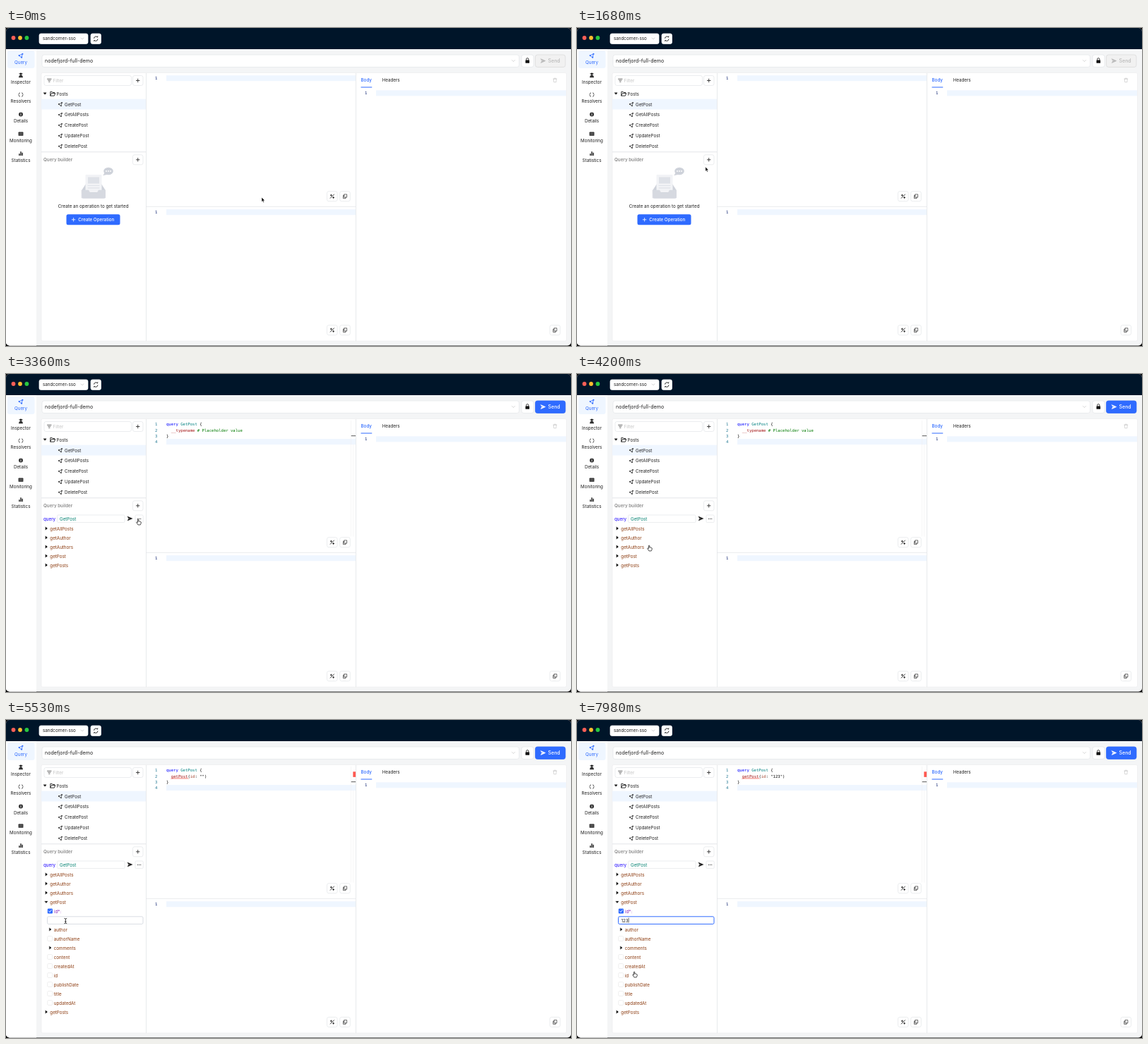
Animation, 800 px wide and 451 px high, one loop 8000 ms. Source, as an HTML page:

```html
<!DOCTYPE html>
<html lang="en">
<head>
<meta charset="utf-8">
<title>Query builder</title>
<style>
html, body { margin: 0; width: 100%; height: 100%; overflow: hidden; background: #000; }
svg { display: block; width: 100vw; height: 100vh; }
text { font-family: Inter, sans-serif; font-size: 6.25px; white-space: pre; }
.code { font-family: "DejaVu Sans Mono", monospace; font-size: 5.6px; }
</style>
</head>
<body>
<svg id="stage" viewBox="0 0 800 451"></svg>
<script>
const LOOP = 8000;
const BLUE = '#2f6bff', PALE = '#eff6ff', LINE = '#e3e5e8', INK = '#1f1f1f', BROWN = '#8b3a0e';

const rect = (x, y, w, h, fill, more = '') =>
  `<rect x="${x}" y="${y}" width="${w}" height="${h}" fill="${fill}" ${more}/>`;
const box = (x, y, w, h, fill = '#fff', stroke = LINE, r = 2.5) =>
  rect(x, y, w, h, fill, `stroke="${stroke}" stroke-width=".7" rx="${r}"`);
const path = (d, stroke = INK, fill = 'none', w = .8) =>
  `<path d="${d}" stroke="${stroke}" fill="${fill}" stroke-width="${w}" stroke-linejoin="round" stroke-linecap="round"/>`;
const dot = (x, y, r, fill) => `<circle cx="${x}" cy="${y}" r="${r}" fill="${fill}"/>`;
// y is the middle of the line
const text = (x, y, s, fill = INK, more = '') =>
  `<text x="${x}" y="${y + 2.3}" fill="${fill}" ${more}>${s}</text>`;
const code = (x, y, s, fill = '#000', more = '') =>
  `<text class="code" x="${x}" y="${y + 2}" fill="${fill}" ${more}>${s}</text>`;
const at = (x, y, s, k = 1) => `<g transform="translate(${x} ${y}) scale(${k})">${s}</g>`;
const group = (id, s) => `<g id="${id}">${s}</g>`;
const span = (s, fill) => `<tspan fill="${fill}">${s}</tspan>`;

const plus = (x, y, c = INK) => path(`M${x - 2.3} ${y}h4.6M${x} ${y - 2.3}v4.6`, c, 'none', .8);
const chevron = (x, y, c = '#bbb') => path(`M${x - 2} ${y - 1}l2 2 2-2`, c, 'none', .6);
const plane = (x, y, c) => at(x, y, path('M-3.4-3.1L3.6 0-3.4 3.1-2.2.5 1 0-2.2-.5Z', c, c, .3));
const nodes = (x, y, c, k = 1) => at(x, y,
  path('M-2 0L2-2L1 2.2Z', c, 'none', .7) + dot(-2.1, 0, .9, c) + dot(2.1, -2, .9, c) + dot(1, 2.3, .9, c), k);
const copyIcon = (x, y) => box(x - 7.3, y - 7, 14.6, 14) +
  path(`M${x - 1} ${y - 2.8}h3.6v4.2h-3.6zM${x - 1} ${y - 1.2}h-1.6v4.2h3.6v-1.6`, '#333', 'none', .7);
const wandIcon = (x, y) => box(x - 7.3, y - 7, 14.6, 14) +
  path(`M${x - 2.6} ${y + 2.6}l5.3-5.3M${x - 2.4} ${y - 1.5}h2M${x - 1.4} ${y - 2.5}v2M${x + .8} ${y + 1.8}h2M${x + 1.8} ${y + .8}v2`, '#222', 'none', .9);
const arrowRight = (x, y) => path(`M${x} ${y - 2}l2.6 2-2.6 2z`, '#000', '#000', .3);
const arrowDown = (x, y) => path(`M${x - 2} ${y - 1}h4l-2 2.5z`, '#000', '#000', .3);
const squiggle = (x, y, w) => {
  let d = `M${x} ${y}`;
  for (let i = 0; i < w; i += 2) d += 'l1-1 1 1';
  return path(d, '#e51400', 'none', .6);
};

function topBar() {
  return rect(0, 0, 800, 30, '#001529') +
    dot(10.5, 14, 2.9, '#ff5f57') + dot(20, 14, 2.9, '#febc2e') + dot(29.4, 14, 2.9, '#28c840') +
    box(47, 8, 69, 14.5, '#fff', '#fff') + text(52, 15, 'sandcorner-sso') + chevron(108, 15) +
    box(120, 8, 14.5, 14.5, '#fff', '#fff') +
    path('M124.6 14.4a2.7 2.7 0 0 1 4.9-1.2l.3-1.4M129.9 16a2.7 2.7 0 0 1-4.9 1.2l-.3 1.4', '#111', 'none', .9);
}

function sideBar() {
  const icons = [
    nodes(0, 0, BLUE, 1.15),
    dot(0, -1.7, 1.7, INK) + path('M-2.6-2h5.2M-2.6 3q0-2.8 2.6-2.8t2.6 2.8z', INK, INK, .5),
    path('M-1.5-2.7q-1 0-1 1.2t-.8 1.5q.8.3.8 1.5t1 1.2M1.5-2.7q1 0 1 1.2t.8 1.5q-.8.3-.8 1.5t-1 1.2', INK, 'none', .7),
    dot(0, 0, 3, '#333') + path('M0-.2v1.7M0-1.6v.1', '#fff', 'none', .8),
    rect(-3.4, -2.6, 6.8, 5.2, '#222', 'rx=".6"') + path('M-2.2-1h4.4M-2.2.8h4.4', '#ccc', 'none', .5),
    rect(-2.8, .2, 1.4, 2.8, INK) + rect(-.7, -2.8, 1.4, 5.8, INK) + rect(1.4, -1.2, 1.4, 4.2, INK)
  ];
  const labels = ['Query', 'Inspector', 'Resolvers', 'Details', 'Monitoring', 'Statistics'];
  return rect(0, 30, 43, 421, '#fff') + rect(2, 32, 38.5, 25, PALE, 'rx="3"') +
    labels.map((s, i) => at(21, 39 + 27.8 * i, icons[i]) +
      text(21, 48.5 + 27.8 * i, s, i ? INK : BLUE, 'text-anchor="middle"')).join('');
}

function sendButton(on) {
  const c = on ? '#fff' : '#b8b8b8';
  return box(749.5, 38, 42.5, 17.5, on ? BLUE : '#f1f1f1', on ? BLUE : '#d9d9d9', 3) + plane(760.5, 46.6, c) +
    text(767.5, 46.7, 'Send', c, 'style="font-size:7px" font-weight="500"');
}

function header() {
  return box(51, 38, 675.5, 17.5, '#fff', LINE, 3) +
    text(55, 46.8, 'nodefjord-full-demo', INK, 'style="font-size:7.1px"') + chevron(718.5, 46.6) +
    box(730, 38, 17, 17.5, '#fff', LINE, 3) +
    rect(735.5, 45.4, 5.6, 4.4, '#111', 'rx=".6"') + path('M736.7 45.4v-1.2a1.6 1.6 0 0 1 3.2 0v1.2', '#111', 'none', .8) +
    sendButton(false) + group('send', sendButton(true));
}

function tree() {
  const names = ['GetPost', 'GetAllPosts', 'CreatePost', 'UpdatePost', 'DeletePost'];
  return box(54, 67.5, 123.5, 14) + path('M58.5 72.3h5.6M59.6 74.3h3.4M60.6 76.3h1.4', '#333', 'none', .7) +
    text(66.5, 74.5, 'Filter', '#c4c4c4') +
    box(179.5, 67.5, 14.5, 14) + plus(186.7, 74.5) +
    arrowDown(55.2, 92.8) + path('M62.8 95.8v-5.4h2.4l.8 1h2.8v1.3M62.8 95.8l1.3-3.1h5.7l-1.3 3.1z', INK, 'none', .9) +
    text(71.5, 93.3, 'Posts') + rect(50, 100.7, 148.3, 14.8, PALE) +
    names.map((s, i) => nodes(77, 108 + 14.9 * i, '#333') + text(83, 108.2 + 14.9 * i, s)).join('');
}

function emptyState() {
  return at(124, 222,
    path('M-16.5 8L-11-.5H11L16.5 8V19H-16.5Z', '#ced2da', '#ced2da', .5) +
    rect(-11.5, -14, 23, 25, '#f2f3f6', 'rx="1.2"') + rect(-8, -10.5, 16, 9, '#dfe2e8') +
    path('M-8 1.5H8M-8 4.8H8', '#dfe2e8', 'none', 1.2) +
    path('M-16.5 8H-7Q-6 12 -3 12H3Q6 12 7 8H16.5V17.5Q16.5 19.5 14.5 19.5H-14.5Q-16.5 19.5-16.5 17.5Z', '#d6d9e0', '#d6d9e0', .5) +
    `<ellipse cx="21" cy="-19" rx="6.8" ry="5.2" fill="#ced2da"/>` + path('M16-17l-2.4 4 5-1.2z', '#ced2da', '#ced2da', .4) +
    dot(18, -19, .9, '#fff') + dot(21, -19, .9, '#fff') + dot(24, -19, .9, '#fff')) +
    text(123.6, 253, 'Create an operation to get started', INK, 'text-anchor="middle"') +
    rect(85.5, 264.3, 76, 15, BLUE, 'rx="2.5"') + plus(95.6, 271.8, '#fff') +
    text(102.3, 271.8, 'Create Operation', '#fff', 'font-weight="500"');
}

function field(name, y, kind, dx = 0) {
  const mark = kind === 'box' ? box(58.8, y - 3.4, 6.8, 6.8, '#fff', '#e8e8e8', 1.2)
    : kind === 'open' ? arrowDown(57, y) : arrowRight(56 + dx, y);
  return mark + text(62.3 + dx, y + .2, name, BROWN);
}

function builder() {
  const sub = ['author', 'authorName', 'comments', 'content', 'createdAt', 'id', 'publishDate', 'title', 'updatedAt'];
  const nested = ['author', 'comments'];
  return text(53, 205.2, 'query', '#1a00ff') + box(72.5, 200, 95.5, 10.6, '#fff', LINE, 1.5) +
    text(76, 205.2, 'GetPost', '#008070') + plane(175.5, 205, '#111') +
    box(183, 200, 11.2, 10.6, '#fff', LINE, 1.5) + dot(186.5, 205.3, .6, INK) + dot(188.6, 205.3, .6, INK) + dot(190.7, 205.3, .6, INK) +
    ['getAllPosts', 'getAuthor', 'getAuthors'].map((s, i) => field(s, 219 + 13 * i)).join('') +
    group('closed', field('getPost', 258) + field('getPosts', 271)) +
    group('open', field('getPost', 258, 'open') +
      rect(58.8, 267.4, 7.2, 7.2, BLUE, 'rx="1.3"') + path('M60.6 271l1.3 1.5 2.5-3', '#fff', 'none', .9) +
      text(68, 271.2, 'id*:', '#8b2bb9') +
      `<rect id="idBox" x="58.5" y="278.8" width="135.5" height="10.6" rx="1.8" fill="#fff"/>` +
      `<text id="idText" x="62.5" y="286.5" fill="${INK}"></text>` +
      `<path id="caret" stroke="#000" stroke-width=".6"/>` +
      sub.map((s, i) => field(s, 297 + 13 * i, nested.includes(s) ? '' : 'box', 5.5)).join('') +
      field('getPosts', 414));
}

function editor() {
  const row = i => 71.2 + 8.3 * i;
  const nums = [0, 1, 2, 3].map(i => code(211, row(i), i + 1, '#237893')).join('');
  return group('blank', rect(227, 67.2, 268, 8, PALE) + code(211, 71.2, '1', '#0b216f')) +
    group('code', rect(227, 92.1, 268, 8, PALE) + nums +
      path('M488.5 66V230M491.5 100V230', '#f0f0f0', 'none', .6) +
      code(227, row(0), span('query', '#0000ff') + span(' GetPost', '#008080') + ' {') +
      `<text id="line2" class="code" x="233.8" y="${row(1) + 2}"></text>` + code(227, row(2), '}') +
      rect(488.7, 87.2, 6.6, 1, '#555') +
      group('lint', squiggle(234, 83.4, 24) + rect(491.3, 73.3, 4, 7.6, '#ff5a52')) +
      group('syntax', squiggle(227, 100.2, 3) + rect(491.3, 87.2, 4, 8.8, '#ff4a42'))) +
    wandIcon(461.8, 238.7) + copyIcon(480, 238.7) +
    code(211, 261.2, '1', '#0b216f') + rect(227, 257.2, 268, 8, PALE) + wandIcon(461.8, 428.4) + copyIcon(480, 428.4);
}

function result() {
  return text(502.5, 74, 'Body', BLUE, 'font-weight="500"') + text(532.7, 74, 'Headers') + rect(502.5, 83.5, 15.7, 1, BLUE) +
    path('M774.8 72.2h5M776.2 72.2v-1h2.2v1M775.4 72.2l.3 4.6h3.2l.3-4.6', '#c8c8c8', 'none', .7) +
    code(508, 92.3, '1', '#0b216f') + rect(524, 88.3, 269, 8, PALE) + copyIcon(777.3, 428.4);
}

function menu() {
  return rect(180, 196, 52, 48.5, '#fff', 'rx="3" style="filter:drop-shadow(0 1.5px 3px rgba(0,0,0,.18))"') +
    rect(182.3, 198, 47.4, 14.3, '#f4f4f4', 'rx="2"') +
    ['Query', 'Mutation', 'Subscription'].map((s, i) => text(186.8, 205.3 + 14.8 * i, s)).join('');
}

const hand = path('M-1.3 3.6L-3 .9q-.5-.9.2-1.1.6-.1 1.2.8V-3.2q0-.8.7-.8t.7.8V-.8q.2-.6.8-.5.5.1.6.6.4-.4.8-.2.4.1.4.6.8-.3.9.5 0 2-.9 3.4Z', '#222', '#fff', .8);
const pointer = path('M0 0V6.1L1.4 4.9 2.4 7.1 3.4 6.6 2.5 4.5H4.3Z', '#fff', '#000', .5);
const beam = path('M-1.5-3.6q1.5 0 1.5.9V2.7q0 .9-1.5.9M1.5-3.6q-1.5 0-1.5.9M0 2.7q0 .9 1.5.9M-.8.8h1.6', '#111', 'none', .8);

document.getElementById('stage').innerHTML =
  `<clipPath id="win"><rect width="800" height="450.5" rx="5"/></clipPath><g clip-path="url(#win)">` +
  rect(0, 0, 800, 451, '#f4f5f6') + topBar() + sideBar() + header() +
  rect(50, 63.5, 743.5, 380.5, '#fff', 'stroke="#ececee" stroke-width=".7" rx="2"') +
  tree() + rect(50, 175.3, 148, 1, LINE) +
  text(53, 186.8, 'Query builder', '#8c8c8c', 'font-weight="600"') + box(179.5, 179.8, 14.5, 14) + plus(186.7, 186.8) +
  group('empty', emptyState()) + group('builder', builder()) +
  editor() + result() +
  rect(198, 64, .8, 380, LINE) + rect(495, 64, .8, 380, LINE) + rect(198, 252.8, 297, .8, LINE) +
  group('menu', menu()) + '</g>' +
  group('cursor', group('pointer', pointer) + group('hand', hand) + group('beam', beam));

const el = {};
document.querySelectorAll('[id]').forEach(n => el[n.id] = n);

const clamp = v => Math.max(0, Math.min(1, v));
const ramp = (t, a, b) => clamp((t - a) / (b - a));
const show = (id, v) => { el[id].style.opacity = +v; };

// time, x, y
const track = [
  [0, 362, 240.3], [980, 362, 240.3], [1700, 181.5, 197], [1820, 187, 189], [2240, 187, 189],
  [2590, 188, 210], [3680, 188, 210], [4200, 103, 247], [4480, 76, 260], [4690, 76, 260],
  [5250, 84.3, 285], [7740, 84.3, 285], [7970, 82, 361]
];
function cursorAt(t) {
  let i = track.length - 1;
  while (track[i][0] > t) i--;
  const a = track[i], b = track[i + 1] || a;
  const k = a === b ? 0 : ramp(t, a[0], b[0]), e = k * k * (3 - 2 * k);
  return [a[1] + (b[1] - a[1]) * e, a[2] + (b[2] - a[2]) * e];
}

const MADE = 2940, OPENED = 4620, FOCUS = 5600;
let lastLine = '';

function draw(t) {
  const value = t < 5880 ? '' : t < 6160 ? '1' : t < 6720 ? '12' : '123';
  const made = t >= MADE, opened = t >= OPENED, focus = t >= FOCUS;

  show('menu', ramp(t, 2030, 2200) * (1 - ramp(t, MADE, 3140)));
  show('send', ramp(t, MADE, 3140));
  show('empty', !made);
  show('builder', made);
  show('blank', !made);
  show('code', made);
  show('closed', !opened);
  show('open', opened);

  const line = opened
    ? span('getPost', '#a31515') + '(' + span('id', '#a0402a') + ': "' + value + '")'
    : span('__typename', '#a31515') + span(' # Placeholder value', '#007a00');
  if (line !== lastLine) el.line2.innerHTML = lastLine = line;
  show('lint', (t >= 5180 && t < 5880) || t >= 7350);
  show('syntax', t >= 5880 && t < 7350);

  el.idBox.setAttribute('stroke', focus ? BLUE : '#d0d5dc');
  el.idBox.setAttribute('stroke-width', focus ? 1 : .8);
  el.idText.textContent = value;
  const cx = 62.9 + (value ? el.idText.getComputedTextLength() : 0);
  el.caret.setAttribute('d', `M${cx} 280.6V287.6`);
  show('caret', focus && !(t >= 7350 && t < 7800));

  const [x, y] = cursorAt(t);
  const kind = t < 1760 ? 'pointer' : y > 278.5 && y < 290 && t > OPENED ? 'beam' : 'hand';
  el.cursor.setAttribute('transform', `translate(${x} ${y})`);
  for (const k of ['pointer', 'hand', 'beam']) show(k, k === kind);
  show('cursor', t < 5880 || t >= 7770);
}

const start = performance.now();
function tick() {
  draw((performance.now() - start) % LOOP);
  requestAnimationFrame(tick);
}
tick();
</script>
</body>
</html>
```
